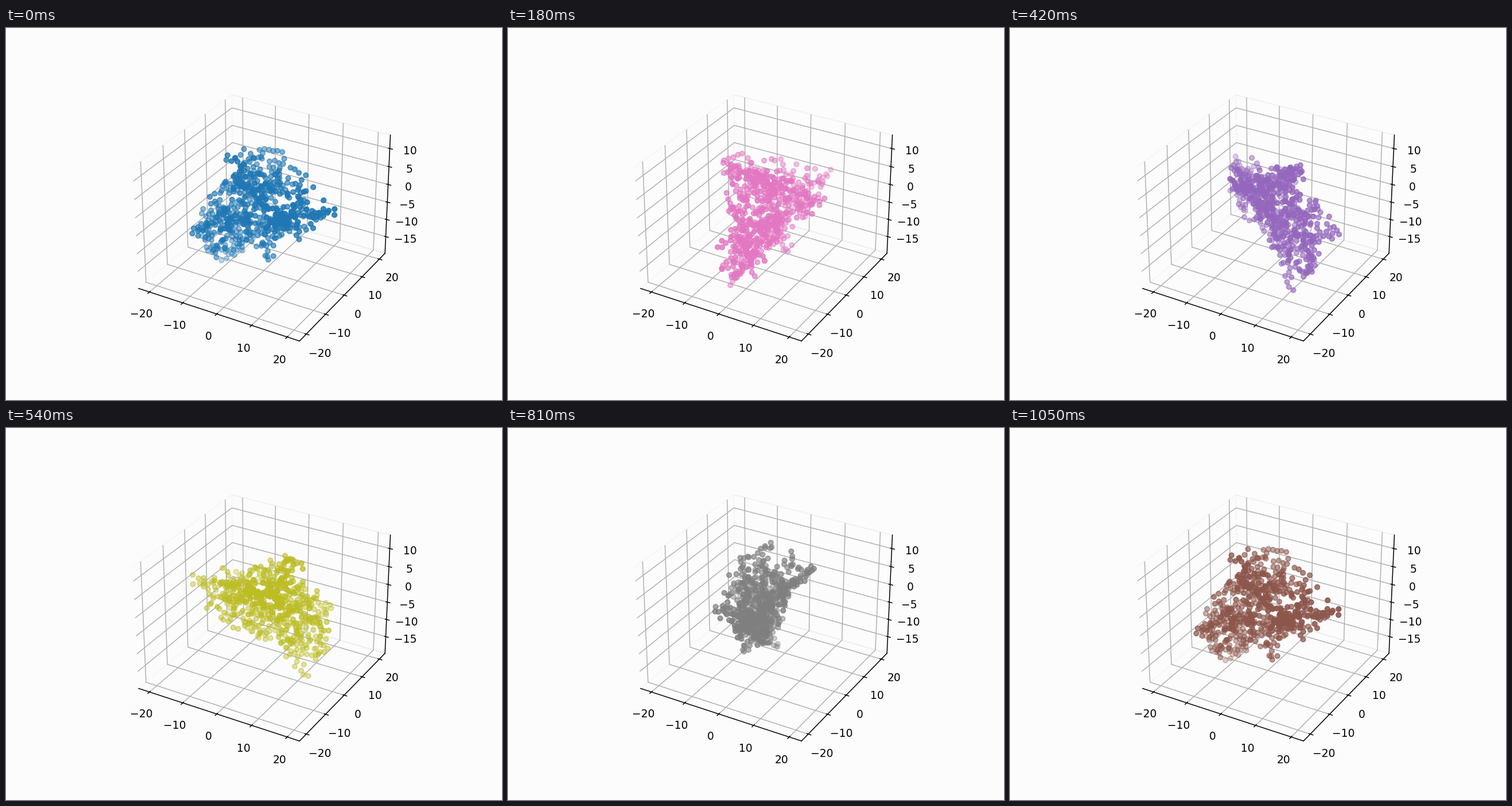
Write a matplotlib script that moves like this. It is 864 px wide and 648 px high and loops after 1.08 s.

```python
import numpy as np
import matplotlib.pyplot as plt
from matplotlib.animation import ArtistAnimation

FRAMES = 36
INTERVAL = 30
COUNT = 580
STEP = 1.35
PAPER = "#fcfcfc"

# Ends of the longest branches: right, away from the viewer, up
TIPS = np.array([
    (17.4, -9.6, 3.0), (-18.0, -5.6, -6.0), (-17.0, 4.8, -6.9),
    (-15.4, 0.6, -15.3), (-9.2, 4.4, -17.8), (1.1, -5.8, -13.3),
    (6.0, -13.5, 1.3), (15.0, -2.4, -3.2), (4.7, 9.4, 8.6),
    (-1.1, 11.6, 8.1), (-9.1, 2.5, 11.2), (-5.9, -5.7, 9.2),
])


def grow(points, target, rng, noise=0.45):
    """Add a jagged chain from the nearest particle to the target."""
    dists = np.linalg.norm(np.array(points) - target, axis=1)
    p, dist = points[int(dists.argmin())], dists.min()
    while dist > 1.6 * STEP:
        move = (target - p) / dist + rng.normal(0, noise, 3)
        p = p + STEP * move / np.linalg.norm(move)
        points.append(p)
        dist = np.linalg.norm(target - p)
    if dist > 0.9 * STEP:
        points.append(target)


def make_cluster():
    rng = np.random.default_rng(4)
    points = [np.zeros(3)]
    for tip in sorted(TIPS, key=np.linalg.norm):
        grow(points, tip, rng)
    # Side branches reach for random places between the tips
    while len(points) < COUNT:
        corners = rng.choice(TIPS, 3, replace=False)
        mix = rng.dirichlet(np.full(3, 0.9)) @ corners
        grow(points, mix * rng.uniform(0.6, 1.15), rng)
    return np.array(points[:COUNT])


def turn(points, angle):
    x, y, z = points.T
    c, s = np.cos(angle), np.sin(angle)
    return c * x - s * y, s * x + c * y, z


fig = plt.figure(figsize=(6.4, 4.8), dpi=135, facecolor=PAPER)
ax = fig.add_subplot(projection="3d", facecolor=PAPER)
for axis in (ax.xaxis, ax.yaxis, ax.zaxis):
    axis.pane.fill = False

# The cluster is stored along the view, which is 30 degrees off the x axis
cluster = turn(make_cluster(), np.pi / 6)
cluster = np.column_stack(cluster)
artists = [
    [ax.scatter(*turn(cluster, angle), color=f"C{k % 10}")]
    for k, angle in enumerate(np.linspace(0, 2 * np.pi, FRAMES))
]
ax.set(xlim=(-23.3, 23.4), ylim=(-23.4, 23.4), zlim=(-19.9, 13.7))

anim = ArtistAnimation(fig, artists, interval=INTERVAL, repeat=True,
                       repeat_delay=0)
plt.show()
```
